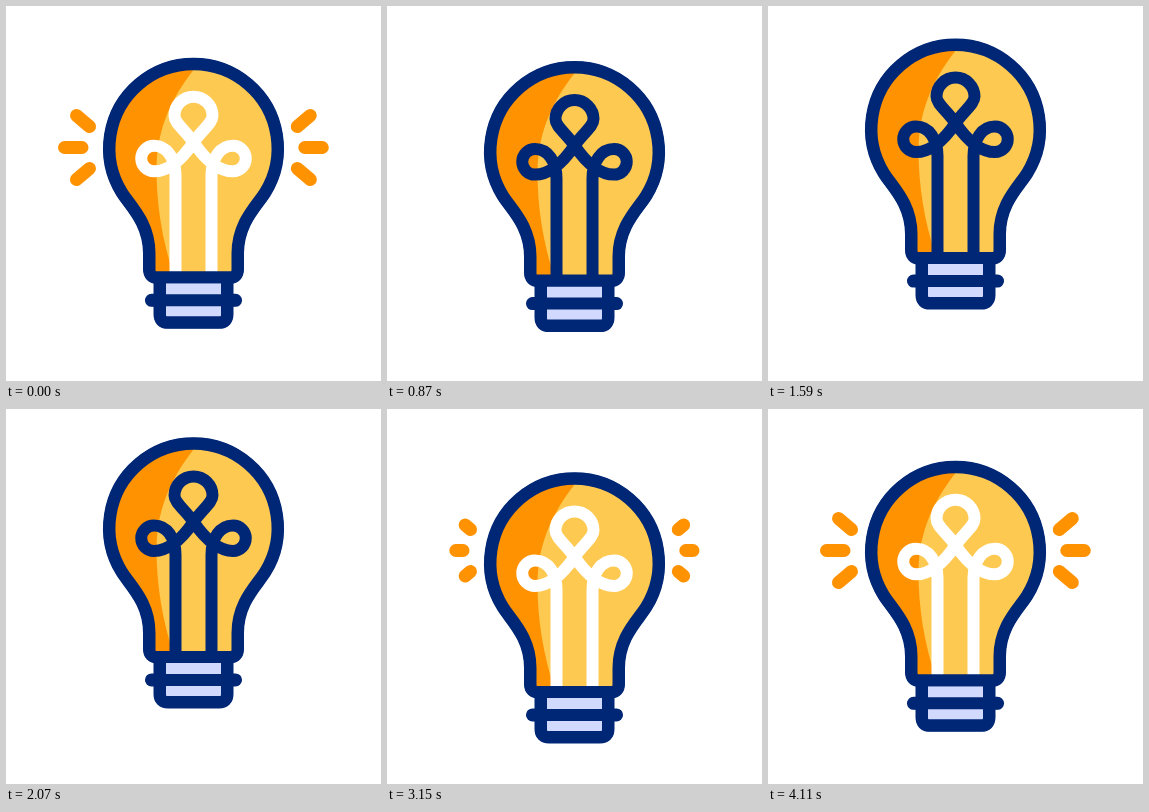
These frames come from a looping animation (375 px wide and 375 px high, 4.5 s). An HTML page with a canvas:

```html
<!DOCTYPE html>
<html lang="en">
<head>
<meta charset="utf-8">
<title>Light bulb</title>
<style>
  html, body { margin: 0; width: 100%; height: 100%; overflow: hidden; background: #fff; }
  canvas { display: block; width: 100vmin; height: 100vmin; }
</style>
</head>
<body>
<canvas></canvas>
<script>
const SIZE = 375, LOOP = 4500, MID = 187.4, REST_Y = -0.7;
const LINE = 12, OUTER_LINE = 13;
const NAVY = '#002776', ORANGE = '#ff9200', YELLOW = '#fdc951', LILAC = '#d2d9ff';
const LIGHT_OFF = 640, LIGHT_ON = 3040;

const canvas = document.querySelector('canvas');
const ctx = canvas.getContext('2d');
const ratio = window.devicePixelRatio || 1;
canvas.width = canvas.height = SIZE * ratio;

const glass = new Path2D(
  'M116 187 A84 84 0 1 1 259 187 C251 200 231.5 217 231.5 248 V264' +
  ' Q231.5 272 223.5 272 H151.5 Q143.5 272 143.5 264 V248 C143.5 217 124 200 116 187 Z');
const glow = new Path2D(
  'M195 56 C168 86 150.5 122 150.5 163 C150.5 200 156 235 169 274 H280 V56 Z');
const filament = new Path2D(
  'M169.5 268 V170 C169.5 153 161 140.5 148 140.5 A12.75 12.75 0 0 0 148 166' +
  ' C165 166 179 149.5 187.5 137' +
  ' C196 124.5 206.5 118 206.5 110.5 A19 19 0 0 0 168.5 110.5' +
  ' C168.5 118 179 124.5 187.5 137 C196 149.5 210 166 227 166' +
  ' A12.75 12.75 0 0 0 227 140.5 C214 140.5 205.5 153 205.5 170 V268');
const socket = new Path2D('M154 272 V309 Q154 317 162 317 H213 Q221 317 221 309 V272 Z');
const ring = new Path2D('M145.5 295 H229.5');

// Left rays, inner end to outer end; mirrored for the right side
const rays = [
  [83.5, 120.5, 70.5, 109.5],
  [76, 141.5, 58.5, 141.5],
  [83.5, 162.5, 70.5, 173.5]
];

// Vertical travel: start time, end time, from, to, easing
const moves = [
  [330, 640, 0, 12.7, [.42, 0, .58, 1]],
  [640, 2400, 12.7, -24, [.14, 0, .15, 1]],
  [2490, 3070, -24, 12.7, [.7, 0, .7, 1]],
  [3070, 3600, 12.7, -9.5, [.42, 0, .58, 1]],
  [3600, 4110, -9.5, 0, [.42, 0, .58, 1]]
];

function bezier(a, b, s) {
  const r = 1 - s;
  return 3 * a * s * r * r + 3 * b * s * s * r + s * s * s;
}

function ease(t, [x1, y1, x2, y2]) {
  if (t <= 0) return 0;
  if (t >= 1) return 1;
  let low = 0, high = 1;
  for (let i = 0; i < 24; i++) {
    const s = (low + high) / 2;
    if (bezier(x1, x2, s) < t) low = s; else high = s;
  }
  return bezier(y1, y2, low);
}

function progress(time, start, end) {
  return ease((time - start) / (end - start), [.42, 0, .58, 1]);
}

function bulbOffset(time) {
  let y = 0;
  for (const [start, end, from, to, curve] of moves) {
    if (time < start) break;
    y = from + (to - from) * ease((time - start) / (end - start), curve);
  }
  return y;
}

function stroke(path, color, width = LINE) {
  ctx.strokeStyle = color;
  ctx.lineWidth = width;
  ctx.stroke(path);
}

function fill(path, color) {
  ctx.fillStyle = color;
  ctx.fill(path);
}

function drawRays(time) {
  if (time >= LIGHT_OFF && time < LIGHT_ON) return;
  // Rays leave through their outer end and grow back from the inner one
  const leaving = time < LIGHT_OFF;
  const from = leaving ? progress(time, 330, LIGHT_OFF) : 0;
  const to = leaving ? 1 : progress(time, 3030, 3300);
  const path = new Path2D();
  for (const [x1, y1, x2, y2] of rays) {
    const xa = x1 + (x2 - x1) * from, ya = y1 + (y2 - y1) * from;
    const xb = x1 + (x2 - x1) * to + .01, yb = y1 + (y2 - y1) * to;
    path.moveTo(xa, ya);
    path.lineTo(xb, yb);
    path.moveTo(2 * MID - xa, ya);
    path.lineTo(2 * MID - xb, yb);
  }
  stroke(path, ORANGE, OUTER_LINE);
}

function drawBulb(time) {
  const lit = time < LIGHT_OFF || time >= LIGHT_ON;
  ctx.save();
  ctx.translate(0, REST_Y + bulbOffset(time));
  // The silhouette is slightly heavier than the inner lines
  for (const part of [glass, socket, ring]) stroke(part, NAVY, OUTER_LINE);
  fill(socket, LILAC);
  stroke(socket, NAVY);
  stroke(ring, NAVY);
  fill(glass, ORANGE);
  ctx.save();
  ctx.clip(glass);
  fill(glow, YELLOW);
  stroke(filament, lit ? '#fff' : NAVY);
  ctx.restore();
  stroke(glass, NAVY);
  ctx.restore();
}

function draw(now) {
  const time = now % LOOP;
  ctx.setTransform(ratio, 0, 0, ratio, 0, 0);
  ctx.fillStyle = '#fff';
  ctx.fillRect(0, 0, SIZE, SIZE);
  ctx.lineCap = ctx.lineJoin = 'round';
  drawRays(time);
  drawBulb(time);
}

const begin = performance.now();
function tick() {
  draw(performance.now() - begin);
  requestAnimationFrame(tick);
}
tick();
</script>
</body>
</html>
```
